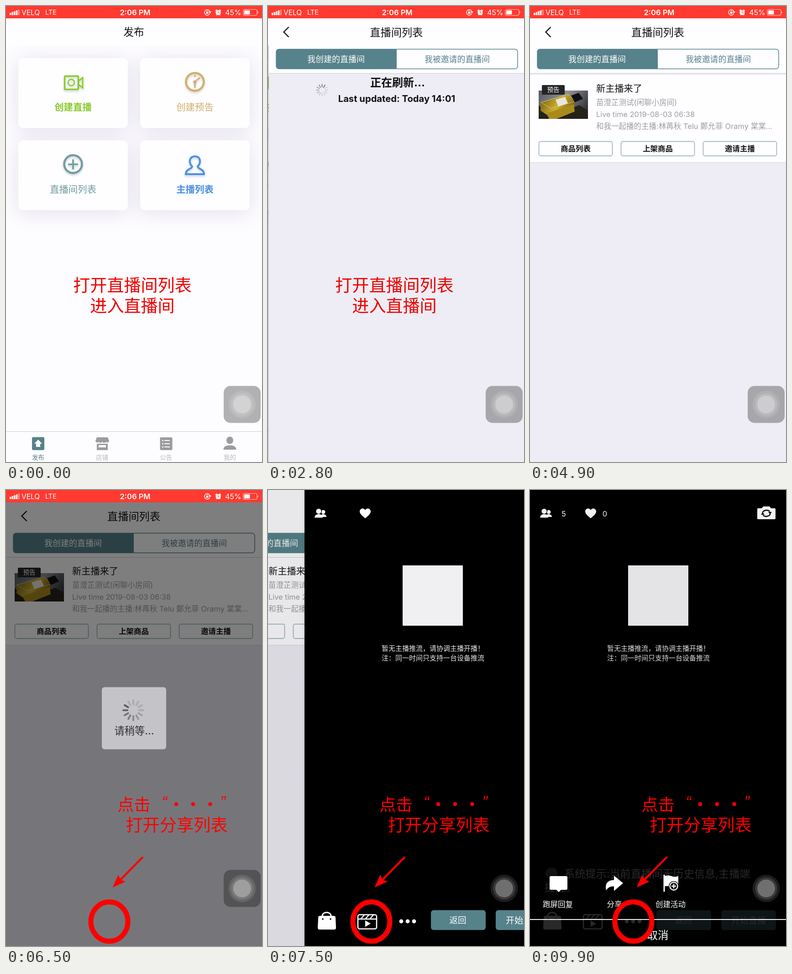
An HTML page with a canvas for the animation above (10 s loop, 561x998 px).

```html
<!DOCTYPE html>
<html lang="zh-CN">
<head>
<meta charset="utf-8">
<title>直播间列表</title>
<style>
html, body { margin: 0; width: 100%; height: 100%; overflow: hidden; background: #fdfcfe; }
canvas { display: block; width: 561px; height: 998px; }
</style>
</head>
<body>
<canvas id="stage" width="561" height="998" lang="zh-CN"></canvas>
<script>
const W = 561, H = 998, LOOP = 10000, STEP = 100;
const FONT = 'Inter, "Noto Sans CJK SC", "Noto Sans CJK", sans-serif';
const TEAL = '#56828b', RED = '#f00', LILAC = '#eeedf5', PAPER = '#fefdff';
const g = document.getElementById('stage').getContext('2d');

// Motion: critically damped approach from 0 to 1, and a plain ramp
function spring(t, start, k) {
  const u = Math.max(0, t - start) * k;
  return 1 - (1 + u) * Math.exp(-u);
}
const ramp = (t, a, b) => Math.min(1, Math.max(0, (t - a) / (b - a)));

// Drawing helpers
function group(fn, x = 0, y = 0, alpha = 1) {
  g.save();
  g.translate(x, y);
  g.globalAlpha *= alpha;
  fn();
  g.restore();
}
function box(x, y, w, h, color) {
  g.fillStyle = color;
  g.fillRect(x, y, w, h);
}
function round(x, y, w, h, r, fill, stroke, lw = 1.5) {
  g.beginPath();
  g.roundRect(x, y, w, h, r);
  paint(fill, stroke, lw);
}
function paint(fill, stroke, lw) {
  if (fill) { g.fillStyle = fill; g.fill(); }
  if (stroke) { g.strokeStyle = stroke; g.lineWidth = lw; g.stroke(); }
}
function disc(x, y, r, fill, stroke, lw) {
  g.beginPath();
  g.arc(x, y, r, 0, 7);
  paint(fill, stroke, lw);
}
function shape(d, fill, stroke, lw = 2) {
  const p = new Path2D(d);
  if (fill) { g.fillStyle = fill; g.fill(p); }
  if (stroke) { g.strokeStyle = stroke; g.lineWidth = lw; g.stroke(p); }
}
// y is the middle of the glyphs
function text(s, x, y, size, color, weight = 400, align = 'center') {
  g.font = `${weight} ${size}px ${FONT}`;
  g.textAlign = align;
  g.fillStyle = color;
  g.fillText(s, x, y + size * 0.37);
}
const left = (s, x, y, size, color, weight) => text(s, x, y, size, color, weight, 'left');

function spinner(x, y, inner, outer, lw, head, rgb) {
  g.lineCap = 'round';
  for (let i = 0; i < 12; i++) {
    const a = i * Math.PI / 6, age = (head - i + 24) % 12;
    const c = Math.sin(a), s = -Math.cos(a);
    g.beginPath();
    g.moveTo(x + c * inner, y + s * inner);
    g.lineTo(x + c * outer, y + s * outer);
    g.strokeStyle = `rgba(${rgb},${Math.max(0.22, 0.9 - age * 0.1)})`;
    g.lineWidth = lw;
    g.stroke();
  }
  g.lineCap = 'butt';
}

function statusBar() {
  box(0, 0, W, 27, '#ff3a30');
  for (let i = 0; i < 5; i++) {
    const h = 5 + i * 1.8;
    box(8 + i * 4.6, 20 - h, 3.4, h, i < 4 ? '#fff' : 'rgba(255,255,255,.4)');
  }
  left('VELQ', 34, 14, 15.5, '#fff');
  left('LTE', 86, 14, 14.5, '#fff');
  text('2:06 PM', 283, 14, 16.5, '#fff', 600);
  g.beginPath();
  g.arc(441, 14, 6, 0.4, 5.9);
  paint(null, '#fff', 1.4);
  shape('M444 12h6l-3 4z', '#fff');
  round(438.5, 13, 5, 4, 0.5, '#fff');
  shape('M439.5 13v-1.5a1.5 1.5 0 0 1 3 0v1.5', null, '#fff', 1);
  disc(465, 14.5, 5.5, '#fff');
  shape('M459 11l3.5-3M471 11l-3.5-3M461 20l1-2M469 20l-1-2', null, '#fff', 1.8);
  shape('M465 11v4h3', null, '#ff3a30', 1.2);
  text('45%', 498, 14, 16, '#fff');
  round(520, 7.5, 30, 13, 3.5, null, 'rgba(255,255,255,.75)', 1.2);
  round(522, 9.5, 12.5, 9, 1.5, '#fff');
  shape('M551.5 11.5q2.5 2.5 0 5z', '#fff');
}

function soft(color, fn) {
  g.save();
  g.shadowColor = color;
  g.shadowBlur = 4;
  g.shadowOffsetY = 3;
  fn();
  g.restore();
}

function home() {
  box(0, 87, W, H - 87, '#fdfcfe');
  g.save();
  g.shadowColor = 'rgba(150,140,185,.24)';
  g.shadowBlur = 44;
  g.shadowOffsetY = 6;
  for (const x of [27, 294]) for (const y of [114, 294]) round(x, y, 240, 153, 11, '#fefdff');
  g.restore();
  for (const x of [27, 294]) for (const y of [114, 294]) round(x, y, 240, 153, 11, '#fefdff');

  soft('rgba(90,130,60,.3)', () => {
    round(128.5, 153.5, 30, 29, 2, null, '#8acb2e', 3.4);
    disc(143, 167.5, 7, null, '#8acb2e', 2.6);
    shape('M159 164l9-7v22l-9-7', null, '#8acb2e', 3);
  });
  soft('rgba(130,110,70,.3)', () => {
    disc(414, 166, 19.5, null, '#d2ae6d', 4.4);
    disc(414, 166, 3.5, '#d2ae6d');
    shape('M414 166v13M417 163l8-6M414 151v4', null, '#d2ae6d', 3.2);
  });
  soft('rgba(70,110,120,.3)', () => {
    disc(147, 346, 19.5, null, '#6f9ca2', 4.4);
    shape('M136 346.500h22M147 335.500v22', null, '#6f9ca2', 3.6);
  });
  soft('rgba(60,100,170,.3)', () => shape(
    'M408 351C400 344 401 329 414 329C427 329 428 344 420 351C420 357 434 356 434 368H394C394 356 408 357 408 351Z',
    null, '#4a90e2', 4));
  text('创建直播', 147, 221, 20.4, '#8acb2e', 700);
  text('创建预告', 414, 221, 20.4, '#d2ae6d', 500);
  text('直播间列表', 147, 401, 20.4, '#6f9ca2', 500);
  text('主播列表', 414, 401, 20.4, '#4a90e2', 700);

  box(0, 931, W, 67, '#fdfcfe');
  box(0, 931, W, 1, '#cccbce');
  const grey = '#9c9b9d';
  round(57, 943.5, 27, 28.5, 3, TEAL);
  shape('M70.500 949l8.500 9h-4v7h-9v-7h-4z', '#fff');
  shape('M199 944h24l3 8a4 4 0 0 1-7 2a5 5 0 0 1-8 0a5 5 0 0 1-8 0a4 4 0 0 1-7-2z', grey);
  shape('M199 958h24v14h-24zM203 961v5h16v-5z', grey);
  round(337.5, 944, 27, 28, 2, grey);
  for (const y of [951, 958, 965]) {
    disc(343.5, y, 1.5, '#fff');
    box(347, y - 1, 12, 2, '#fff');
  }
  g.beginPath();
  g.ellipse(490.5, 950.5, 7.5, 8, 0, 0, 7);
  paint(grey);
  shape('M476.500 971c0-7 6-9.500 14-9.500s14 2.500 14 9.500z', grey);
  ['发布', '店铺', '公告', '我的'].forEach((s, i) =>
    text(s, 70.5 + i * 140, 988.5, 13.5, i ? '#b9b8ba' : TEAL));
}

function photo() {
  g.save();
  g.beginPath();
  g.rect(19, 182, 108, 62);
  g.clip();
  const bg = g.createLinearGradient(19, 182, 110, 244);
  bg.addColorStop(0, '#55585e');
  bg.addColorStop(0.5, '#8f9298');
  bg.addColorStop(1, '#303238');
  box(19, 182, 108, 62, bg);
  shape('M19 214L45 238L108 214L127 226V244H19Z', '#25221a');
  const gold = g.createLinearGradient(25, 200, 90, 240);
  gold.addColorStop(0, '#7a6413');
  gold.addColorStop(0.5, '#cdb032');
  gold.addColorStop(1, '#665009');
  shape('M24 208L84 190L98 206L94 224L50 244L23 226Z', gold);
  shape('M36 232L96 212L98 228L58 244H42Z', '#a98b1c');
  shape('M24 208L84 190L98 206L46 221Z', null, '#e0ca63', 1);
  shape('M56 202L77 196L83 210L62 217Z', '#e9e6da');
  shape('M90 193L107 187L116 200L98 208Z', '#111');
  g.restore();
  round(26, 170, 50, 21, 2, '#242426');
  text('预告', 51, 180.5, 13.5, '#fff');
}

function card() {
  box(0, 148, W, 191, PAPER);
  box(0, 339, W, 1, '#d8d7dc');
  photo();
  left('新主播来了', 145, 178, 20.2, '#111');
  const grey = '#9d9ca0';
  left('苗澄芷测试(闲聊小房间)', 145, 208, 16.5, grey);
  left('Live time 2019-08-03 06:38', 145, 234, 16.3, grey);
  left('和我一起播的主播:林苒秋 Telu 鄭允菲 Oramy 棠棠…', 145, 260, 16.5, grey);
  ['商品列表', '上架商品', '邀请主播'].forEach((s, i) => {
    round(19.5 + i * 180, 293.5, 161, 31.5, 4, null, '#8ba9ad', 1.4);
    text(s, 100 + i * 180, 309, 16.4, '#111', 700);
  });
}

const SHOWN = 3400;
function list(t) {
  const pull = t < SHOWN ? spring(t, 650, 0.00331) : 1 - spring(t, 3390, 0.00331);
  const drop = Math.round(73 * pull);
  box(0, 87, W, H - 87, LILAC);
  g.save();
  g.beginPath();
  g.rect(0, 148, W, H);
  g.clip();
  if (drop > 0) group(() => {
    text('正在刷新...', 282, 167, 24, '#111', 700);
    text('Last updated: Today 14:01', 280, 203, 20.2, '#111', 700);
    spinner(116.5, 184, 7, 12.5, 2.2, t / STEP + 9, '110,110,115');
  }, 0, drop - 73, Math.sqrt(pull));
  if (t >= SHOWN) group(card, 0, drop);
  g.restore();

  box(0, 87, W, 60, PAPER);
  box(0, 147, W, 1, '#c9c8cd');
  round(16, 94.5, 529, 43, 6, PAPER);
  g.beginPath();
  g.roundRect(16, 94.5, 264, 43, [6, 0, 0, 6]);
  paint(TEAL);
  round(16, 94.5, 529, 43, 6, null, TEAL, 1.5);
  text('我创建的直播间', 147, 116, 18, '#fff');
  text('我被邀请的直播间', 412.5, 116, 17.9, TEAL);
}

// Opacity of the home title and of the list title, which trails the page at x
function nav(homeAlpha, listAlpha, x) {
  box(0, 0, W, 87, PAPER);
  group(() => text('发布', 280, 57, 22.8, '#111', 500), 0, 0, homeAlpha);
  group(() => {
    text('直播间列表', 280 + x * 0.65, 57, 23.2, '#111', 500);
    shape('M45.500 46L34.500 57L45.500 68', null, '#111', 2.4);
  }, 0, 0, listAlpha);
}

function person(x, y, s) {
  disc(x, y - 5 * s, 5.6 * s, '#fff');
  shape(`M${x - 9 * s} ${y + 9 * s}q0-${7 * s} ${9 * s}-${8 * s}q${9 * s} ${s} ${9 * s} ${8 * s}z`, '#fff');
}

function live(t) {
  box(0, 0, W, H, '#000');
  person(41, 52, 0.78);
  disc(31, 46, 7, '#000');
  person(31, 51.5, 1);
  shape('M133 62C126 56 121 52 121 47C121 40 130 38 133 44C136 38 145 40 145 47C145 52 140 56 133 62Z', '#fff');
  if (t >= 8000) {
    text('5', 74, 52, 16.5, '#fff');
    text('0', 164, 52, 16.5, '#fff');
  }
  shape('M500 40h8l3-4h14l3 4h8q2 0 2 2v20q0 2-2 2h-36q-2 0-2-2v-20q0-2 2-2z', '#fff');
  shape('M509.500 50a9 7 0 0 1 16-3M526.500 52a9 7 0 0 1-16 3', null, '#000', 2.4);
  shape('M522 48h8l-4 5zM506 54h8l-4-5z', '#000');

  box(215, 165, 132, 132, '#f0eff1');
  left('暂无主播推流，请协调主播开播！', 169, 346, 15, '#e8e8e8');
  left('注：同一时间只支持一台设备推流', 169, 367, 15, '#e8e8e8');

  if (t >= 8500) {
    disc(47, 839, 13, '#666');
    left('系统提示:当前直播间无历史信息,主播端', 75, 839, 23.2, '#fff');
    left('提醒。', 32, 869, 23.2, '#fff');
  }
  shape('M34 932h30q4 0 4 4l1 22q0 4-4 4h-32q-4 0-4-4l1-22q0-4 4-4z', '#fff');
  shape('M39 936v-4a9.500 7.500 0 0 1 19 0v4', null, '#fff', 3);
  disc(40, 939, 1.8, '#000');
  disc(57, 939, 1.8, '#000');
  round(117, 929.5, 41, 31, 4, null, '#fff', 2.6);
  shape('M117 939h41M124 938l7-8M134 938l7-8M144 938l7-8', null, '#fff', 2.4);
  shape('M133 942l12 7l-12 7z', '#fff');
  for (const x of [212, 226, 240]) disc(x, 944, 4.4, '#fff');
  round(277, 919.5, 120, 43.5, 6, TEAL);
  round(419, 919.5, 120, 43.5, 6, TEAL);
  text('返回', 336, 941.5, 18.6, '#fff');
  text('开始直播', 479, 941.5, 19, '#fff');
}

function sheet(p) {
  box(0, 0, W, H, `rgba(0,0,0,${0.05 * p})`);
  group(() => {
    box(0, 812, W, 186, 'rgba(0,0,0,.83)');
    shape('M46 844h33q3 0 3 3v24q0 3-3 3h-11l-5 5l-5-5h-12q-3 0-3-3v-24q0-3 3-3z', '#fff');
    shape('M184 843l20 16.500l-20 17v-10q-12-1-17 9q-5-22 17-23z', '#fff');
    shape('M294 841v37', null, '#fff', 3);
    shape('M295 844q8-3 15 0t15 0v22h-30z', '#fff');
    disc(315, 866, 11, '#000');
    disc(315, 866, 8.5, null, '#fff', 2.4);
    shape('M310 866h10M315 861v10', null, '#fff', 2.4);
    text('跑屏回复', 61, 906, 16.5, '#fff');
    text('分享', 185, 906, 16.5, '#fff');
    text('创建活动', 308, 906, 16.5, '#fff');
    box(0, 938, W, 2, '#f4f4f4');
    text('取消', 280, 973, 23.5, '#fff');
  }, 0, Math.round(186 * (1 - p)));
}

function hud(t, a) {
  group(() => {
    box(0, 27, W, H - 27, 'rgba(0,0,0,.5)');
    round(210, 431.5, 141, 136, 6, '#c4c3c8');
    spinner(279, 482, 13, 22, 4, t / STEP + 5, '80,80,84');
    text('请稍等...', 281, 527, 22.3, '#303033', 500);
  }, 0, 0, a);
}

function touchButton() {
  round(477, 831.5, 81, 81, 15, 'rgba(0,0,0,.3)');
  disc(517.5, 872, 30, 'rgba(255,255,255,.11)');
  disc(517.5, 872, 24.5, 'rgba(255,255,255,.12)');
  disc(517.5, 872, 19.5, 'rgba(255,255,255,.28)');
}

function notes(t) {
  if (t < 4600) {
    text('打开直播间列表', 277, 611, 37.1, '#ee0000');
    text('进入直播间', 277, 656, 37.1, '#ee0000');
  }
  if (t < 5500) return;
  left('点击', 244, 688, 36.5, RED);
  g.font = 'italic 36px "Liberation Sans", sans-serif';
  g.textAlign = 'center';
  g.fillText('“', 347, 696);
  g.fillText('”', 475, 696);
  for (const x of [373, 410, 447.5]) disc(x, 687.5, 4.3, RED);
  text('打开分享列表', 374, 733, 37.2, RED);
  shape('M300 803L250 854', null, RED, 4.4);
  shape('M233.500 870L246 842L251 853L262 857Z', RED);
  g.beginPath();
  g.ellipse(226.5, 944.5, 40.5, 43, 0, 0, 7);
  paint(null, RED, 11);
}

// New page sliding over an old one, with parallax and a light shade
function push(p, under, over) {
  const x = Math.round(W * (1 - p));
  if (x > 0) {
    group(under, Math.round(-0.3 * (W - x)));
    box(0, 0, W, H, `rgba(0,0,0,${0.1 * p})`);
    const edge = g.createLinearGradient(x - 6, 0, x, 0);
    edge.addColorStop(0, 'rgba(0,0,0,0)');
    edge.addColorStop(1, `rgba(0,0,0,${0.08 * p})`);
    box(x - 6, 0, 6, H, edge);
  }
  if (p > 0) group(over, x);
  return x;
}

function draw(t) {
  g.clearRect(0, 0, W, H);
  if (t < 6600) {
    const p = spring(t, 444, 0.00331);
    const x = push(p, home, () => list(t));
    nav(1 - p, p, x);
  } else {
    const p = spring(t, 6544, 0.0036);
    push(p, () => {
      list(t);
      nav(0, 1 - p, 0);
    }, () => live(t));
  }
  if (t >= 9100) sheet(spring(t, 9050, 0.009));
  const leave = 1 - ramp(t, 6500, 6900);
  const wait = ramp(t, 5200, 5600) * leave;
  if (wait > 0) hud(t, wait);
  if (leave > 0) group(statusBar, 0, 0, leave);
  touchButton();
  notes(t);
}

function frame(now) {
  draw(Math.floor((now % LOOP) / STEP) * STEP);
  requestAnimationFrame(frame);
}
draw(0);
requestAnimationFrame(frame);
</script>
</body>
</html>
```
